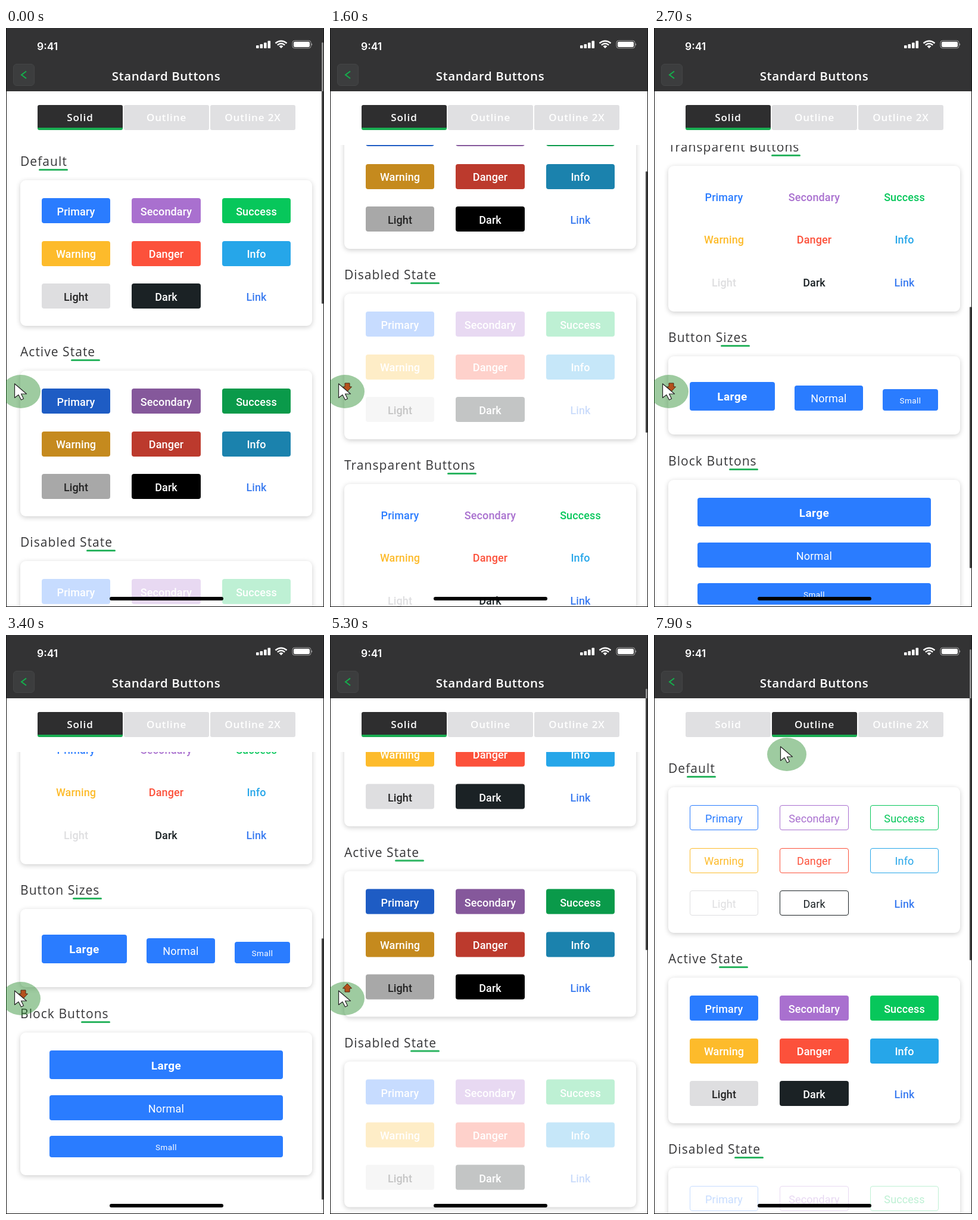
An HTML page for the animation above (8000 ms loop, 534 by 970 pixels).

```html
<!DOCTYPE html>
<html lang="en">
<head>
<meta charset="utf-8">
<title>Standard Buttons</title>
<style>
@property --scroll { syntax: '<number>'; inherits: true; initial-value: 0; }

html, body { margin: 0; width: 100%; height: 100%; overflow: hidden; background: #fff; }
.stage { position: relative; width: 534px; height: 970px; overflow: hidden; background: #fff; }
.stage div, .stage svg { position: absolute; box-sizing: border-box; }

/* Header */
.header { left: 0; top: 0; width: 533px; height: 106px; background: #333334; color: #fff; }
.clock { left: 52px; top: 20px; font: 600 17.5px/22px Inter, sans-serif; }
.title { left: 0; top: 66px; width: 538px; text-align: center; font: 600 20.5px/28px "Open Sans", sans-serif; letter-spacing: .55px; }
.back { left: 12px; top: 60px; width: 36px; height: 37px; border: 1px solid #444546; border-radius: 6px; background: #3c3d3e; }

/* Tabs */
.tab {
  top: 129px; width: 143px; height: 42px; border-radius: 3px; background: #e0e0e2; color: #fff;
  text-align: center; font: 600 17px/41px "Open Sans", sans-serif; letter-spacing: .9px;
}
.tab.on { background: #2e2e2f; border-bottom: 4px solid #18ad51; }

/* Scrolling list */
.list { left: 0; top: 196px; width: 533px; height: 774px; overflow: hidden; }
.content { left: 0; top: -196px; width: 533px; height: 2000px; transform: translateY(calc(var(--scroll) * -1px)); }
.heading { left: 24px; height: 30px; white-space: nowrap; color: #363638; font: 400 21px/30px "Open Sans", sans-serif; letter-spacing: 1.05px; }
.rule { width: 49px; height: 3px; border-radius: 1.5px; background: #2bb460; }
.card { left: 24px; width: 490px; border-radius: 9px; background: #fff; box-shadow: 0 2px 8px rgba(0, 0, 0, .2); }

.btn {
  display: flex; align-items: center; justify-content: center; border-radius: 4px; padding-top: 2px;
  background: var(--c); color: #fff; font: 500 18px Roboto, sans-serif; letter-spacing: .1px;
}
.btn.light { color: #222; }
.btn.outline { background: none; border: 1.4px solid var(--c); color: var(--c); font-weight: 400; }
.btn.plain, .btn.link { background: none; border: 0; color: var(--c); font-weight: 500; }
.btn.faded { opacity: .26; }
.btn.large { font-size: 19px; font-weight: 700; letter-spacing: .4px; }
.btn.normal { font-weight: 400; letter-spacing: .2px; }
.btn.small { font-size: 13.5px; font-weight: 400; letter-spacing: .4px; }

.bar { left: 530px; top: calc(24px + var(--scroll) * .4515px); width: 3px; border-radius: 1.5px; background: linear-gradient(#8e8e8e 106px, #444 0) fixed; }
.home { left: 174px; top: 953px; width: 191px; height: 6px; border-radius: 3px; background: #000; }
.edge { background: #111; }

/* Pointer */
.pointer { left: 0; top: 0; width: 0; height: 0; }
.pointer svg { left: -34px; top: -29px; overflow: visible; }

/* Motion: one shared 8 s loop */
.content, .bar, .view, .pointer, .anim { animation: 8s linear infinite; }
.content { animation-name: scroll; }
.bar { animation-name: scroll, grow; animation-duration: 8s; animation-delay: -60ms, 0s; animation-timing-function: linear, step-end; }
.view.solid { animation-name: leave; animation-timing-function: step-end; }
.view.outlined { animation-name: enter; animation-timing-function: step-end; }
.pointer { animation-name: move; }
.anim { animation-timing-function: step-end; }
.down { animation-name: down; }
.up { animation-name: up; }
.arrow { animation-name: arrow; }
.hand { animation-name: hand; }

@keyframes scroll {
  0%, 7.25% { --scroll: 0; }
  12.5% { --scroll: 146; }
  27.5% { --scroll: 749; }
  33.5%, 39.5% { --scroll: 981; }
  42.25%, 52% { --scroll: 1072; }
  66.25% { --scroll: 179; }
  70.5%, 100% { --scroll: 0; }
}
@keyframes grow { 0% { height: 438px; } 90%, 100% { height: 521px; } }
@keyframes leave { 0% { visibility: visible; } 90%, 100% { visibility: hidden; } }
@keyframes enter { 0% { visibility: hidden; } 90%, 100% { visibility: visible; } }
@keyframes move {
  0%, 75% { transform: translate(25px, 609px); }
  76.5% { transform: translate(32px, 619px); animation-timing-function: ease-in-out; }
  81.5%, 96.25% { transform: translate(252.5px, 168px); }
  98.5%, 100% { transform: translate(223px, 200px); }
}
@keyframes down { 0% { opacity: 0; } 7% { opacity: 1; } 46.2%, 100% { opacity: 0; } }
@keyframes up { 0% { opacity: 0; } 52% { opacity: 1; } 71%, 100% { opacity: 0; } }
@keyframes arrow { 0% { opacity: 1; } 81% { opacity: 0; } 96.5%, 100% { opacity: 1; } }
@keyframes hand { 0% { opacity: 0; } 81% { opacity: 1; } 96.5%, 100% { opacity: 0; } }
</style>
</head>
<body>
<div class="stage">
  <div class="view solid"></div>
  <div class="view outlined"></div>

  <div class="header">
    <div class="clock">9:41</div>
    <div class="title">Standard Buttons</div>
    <div class="back"></div>
    <svg width="534" height="105" fill="none">
      <path d="M34 72.5 L26 78.5 L34 84.5" stroke="#14b04c" stroke-width="2"/>
      <g fill="#fff">
        <rect x="420" y="29" width="4.6" height="5" rx="1"/>
        <rect x="426.5" y="27" width="4.6" height="7" rx="1"/>
        <rect x="433" y="24.5" width="4.6" height="9.5" rx="1"/>
        <rect x="439.5" y="21.5" width="4.6" height="12.5" rx="1"/>
        <path d="M458.5 30.5 Q462 28 465.5 30.5 L462 34 Z"/>
        <rect x="483" y="23" width="27" height="9" rx="2"/>
        <path d="M513 25.5 q2.4 2 0 4 z" opacity=".6"/>
      </g>
      <path d="M452.5 25.5 Q462 18 471.5 25.5 M455.8 28.6 Q462 23.6 468.2 28.6" stroke="#fff" stroke-width="2.4"/>
      <rect x="481" y="21.2" width="31" height="12.6" rx="3.5" stroke="#a5a5a5"/>
    </svg>
  </div>

  <div class="bar"></div>
  <div class="home"></div>
  <div class="edge" style="left:0;top:0;width:1px;height:970px"></div>
  <div class="edge" style="left:533px;top:0;width:1px;height:970px"></div>
  <div class="edge" style="left:0;top:969px;width:534px;height:1px"></div>

  <div class="pointer">
    <svg width="68" height="58" viewBox="-34 -29 68 58">
      <ellipse rx="33" ry="28" fill="rgb(40,140,45)" fill-opacity=".45"/>
      <g fill="#b5511c" stroke="#4c2a12">
        <path class="anim down" d="M0 -14 h8 v6 h3.5 L4 0 L-3.5 -8 H0 Z"/>
        <path class="anim up" d="M4 -25 L11.5 -17 H8 v6 H0 v-6 H-3.5 Z"/>
      </g>
      <g fill="#fff" stroke="#222" stroke-width="1.2" stroke-linejoin="round">
        <path class="anim arrow" d="M-10.5 -13 v23.5 l6.5 -5 l4.5 8.5 l4 -2 l-4 -8 h9 Z"/>
        <path class="anim hand" stroke-width="1.6" d="M-5.5 1 V-9.5 q0 -2.3 2.4 -2.3 t2.4 2.3 V-4 q2.6 -1.6 4.8 .5 q2.7 -1.2 4.4 .9 q4.6 -1.2 5.2 2.6 q0 6.5 -3.2 9 v3.5 H-2.5 v-2.5 q-4.5 -3.4 -8 -8.4 q-2.4 -3 .4 -3.8 q2.3 -.2 4.6 3.2 Z"/>
      </g>
    </svg>
  </div>
</div>

<script>
const names = ['Primary', 'Secondary', 'Success', 'Warning', 'Danger', 'Info', 'Light', 'Dark', 'Link'];
const base = ['#2a7cff', '#a970cf', '#07c75b', '#fdbb2b', '#fc513b', '#26a6e9', '#dedee0', '#1b2225', '#3b7cf0'];
const pressed = ['#1e5cc4', '#85589b', '#0a9a4a', '#c58a1e', '#bc3a2d', '#1b82ad', '#a8a8a8', '#000', '#3b7cf0'];

function add(parent, cls, text = '', style = {}) {
  const el = document.createElement('div');
  el.className = cls;
  el.textContent = text;
  for (const key in style) {
    const v = style[key];
    el.style.setProperty(key, typeof v === 'number' ? v + 'px' : v);
  }
  parent.append(el);
  return el;
}

// Heading centred on y, its underline ending at ruleEnd, and the card below.
function section(list, title, y, ruleEnd, height) {
  add(list, 'heading', title, { top: y - 14 });
  add(list, 'rule', '', { top: y + 13.5, left: ruleEnd - 49 });
  add(list, 'card', '', { top: y + 33, height });
}

function grid(list, y, colors, kind) {
  names.forEach((name, i) => {
    const col = i % 3, row = Math.floor(i / 3);
    add(list, `btn ${name.toLowerCase()} ${kind}`, name, {
      left: [60, 211, 363][col], top: y + 63.4 + row * 71.3,
      width: col === 1 ? 116 : 115, height: 42, '--c': colors[i]
    });
  });
}

function sized(list, name, left, top, width, height) {
  add(list, 'btn ' + name.toLowerCase(), name, { left, top, width, height, '--c': base[0] });
}

function build(view, active, style) {
  ['Solid', 'Outline', 'Outline 2X'].forEach((name, i) =>
    add(view, i === active ? 'tab on' : 'tab', name, { left: 53 + i * 145 }));

  const list = add(add(view, 'list'), 'content');
  section(list, 'Default', 222, 104, 244);
  grid(list, 222, base, style);
  section(list, 'Active State', 541, 158, 244);
  grid(list, 541, active ? base : pressed, '');
  section(list, 'Disabled State', 860, 184, 244);
  grid(list, 860, base, style + ' faded');
  section(list, 'Transparent Buttons', 1179, 246, 244);
  grid(list, 1179, base, 'plain');

  section(list, 'Button Sizes', 1498, 161, 131);
  sized(list, 'Large', 60, 1573.5, 143, 48);
  sized(list, 'Normal', 236, 1579.5, 115, 42);
  sized(list, 'Small', 384, 1585.5, 93, 36);

  section(list, 'Block Buttons', 1705, 175, 239);
  sized(list, 'Large', 73, 1768, 392, 48);
  sized(list, 'Normal', 73, 1843, 392, 42);
  sized(list, 'Small', 73, 1911, 392, 36);
}

build(document.querySelector('.solid'), 0, '');
build(document.querySelector('.outlined'), 1, 'outline');
</script>
</body>
</html>
```
